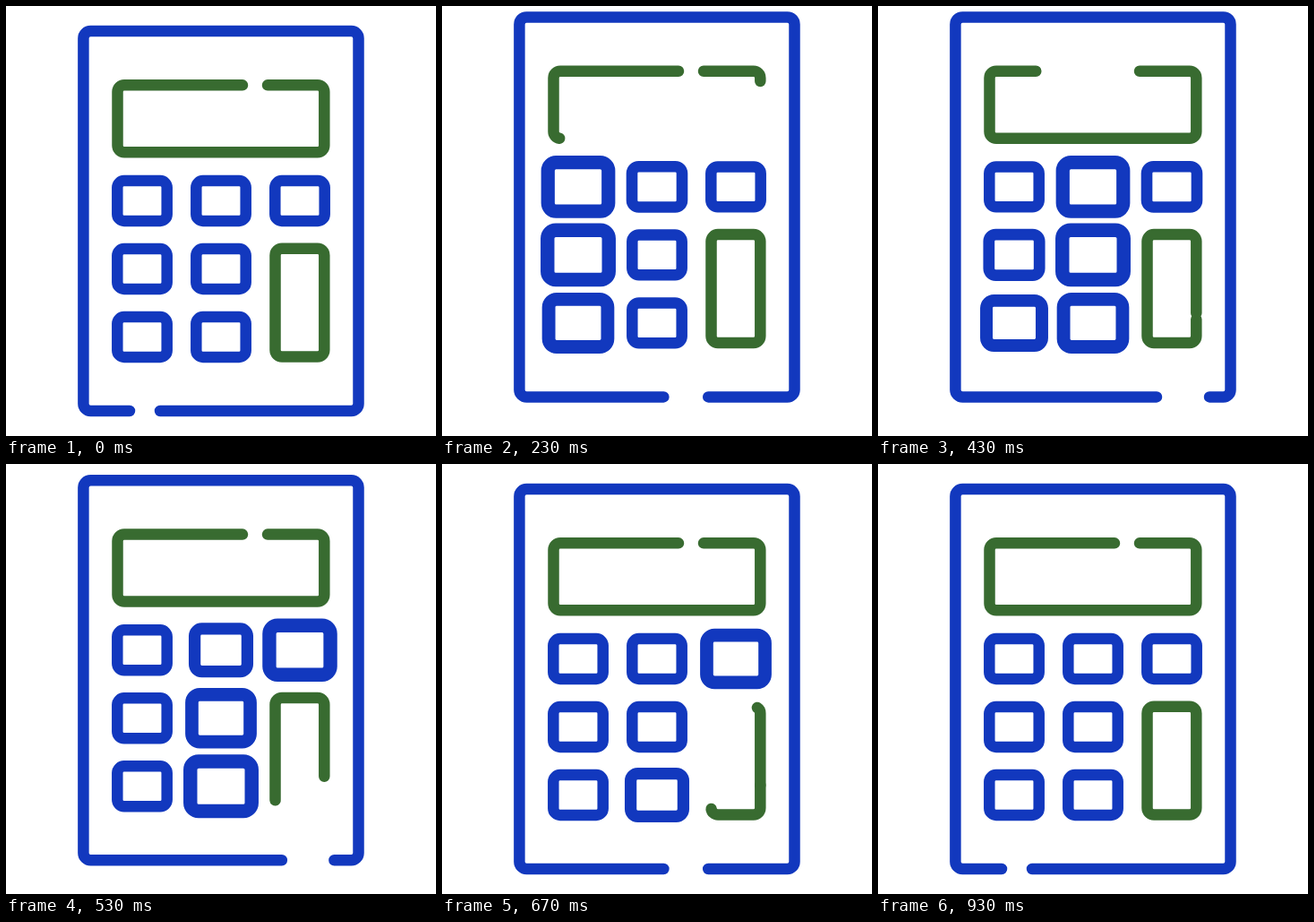
Write an HTML page that moves like this. It is 480x480 px and loops after 1530 ms.

```html
<!DOCTYPE html>
<html lang="en">
<head>
<meta charset="utf-8">
<title>Calculator</title>
<style>
  html, body { margin: 0; width: 100%; height: 100%; overflow: hidden; background: #fff; }
  svg { display: block; width: 100vw; height: 100vh; }
</style>
</head>
<body>
<svg id="stage" viewBox="0 0 480 480">
  <g id="body" fill="none" stroke-width="12.5" stroke-linecap="round"></g>
</svg>
<script>
const LOOP = 1530, LAST = 28;
const BLUE = '#1238be', GREEN = '#386b30';
const body = document.getElementById('body');

const clamp = x => Math.min(1, Math.max(0, x));
const mix = (a, b, p) => a + (b - a) * p;
const smooth = x => (x = clamp(x), x * x * (3 - 2 * x));

// Cubic timing curve with end heights 0 and 1
function curve(x1, x2) {
  return x => {
    if (x <= 0) return 0;
    if (x >= 1) return 1;
    let lo = 0, hi = 1;
    for (let i = 0; i < 24; i++) {
      const t = (lo + hi) / 2, u = 1 - t;
      if (3 * u * u * t * x1 + 3 * u * t * t * x2 + t * t * t < x) lo = t; else hi = t;
    }
    return lo * lo * (3 - 2 * lo);
  };
}
const hop = curve(.33, .3);
const steep = curve(.66, .34);

function add(name, attrs) {
  const el = document.createElementNS('http://www.w3.org/2000/svg', name);
  for (const k in attrs) el.setAttribute(k, attrs[k]);
  return body.appendChild(el);
}

// A stroke that is wiped from its start and then redrawn behind the wipe
function trimmed(d, wipe, redraw) {
  const parts = [0, 1].map(() => add('path', { d, stroke: GREEN, pathLength: 1 }));
  const show = (el, a, b) => {
    const on = b - a > .001;
    el.setAttribute('visibility', on ? 'visible' : 'hidden');
    if (!on) return;
    if (b - a > .999) {
      el.removeAttribute('stroke-dasharray');
      el.removeAttribute('stroke-dashoffset');
    } else {
      el.setAttribute('stroke-dasharray', `${b - a} 2`);
      el.setAttribute('stroke-dashoffset', -a);
    }
  };
  return n => {
    show(parts[0], 0, smooth((n - redraw[0]) / redraw[1]));
    show(parts[1], smooth((n - wipe[0]) / wipe[1]), 1);
  };
}

const frame = add('path', { stroke: BLUE });

const setDisplay = trimmed(
  'M292 88.3H347.8a7.5 7.5 0 0 1 7.5 7.5V155.8a7.5 7.5 0 0 1 -7.5 7.5H132' +
  'a7.5 7.5 0 0 1 -7.5 -7.5V95.8a7.5 7.5 0 0 1 7.5 -7.5H264',
  [0, 12], [4.5, 11.3]);

const setTall = trimmed(
  'M355.3 358.5V384a7.5 7.5 0 0 1 -7.5 7.5H308a7.5 7.5 0 0 1 -7.5 -7.5V278.2' +
  'a7.5 7.5 0 0 1 7.5 -7.5H347.8a7.5 7.5 0 0 1 7.5 7.5V358.5',
  [12, 12], [16, 12]);

// Keys pulse one after another, column by column
const keys = Array.from({ length: 7 }, (_, i) => ({
  x: 152 + 88 * Math.floor(i / 3),
  y: 217.5 + 76 * (i % 3),
  start: 2 * i,
  el: add('rect', { x: -27.7, y: -22.4, width: 55.4, height: 44.8, rx: 7.5, stroke: BLUE })
}));

function draw(ms) {
  const t = ms % LOOP, r = t % 100;
  const n = Math.min(LAST, Math.floor(t / 100) * 3 + (r >= 70 ? 2 : r >= 30 ? 1 : 0));

  body.setAttribute('transform', `translate(0 ${-16.9 * hop(1 - Math.abs(n - 10) / 10)})`);

  const p = n < 13.5 ? steep(n / 12.8) : 1 - steep((n - 14.2) / 12.8);
  frame.setAttribute('d',
    `M${mix(172, 370, p)} 452H385.5a8 8 0 0 0 8 -8V36a8 8 0 0 0 -8 -8H94.4` +
    `a8 8 0 0 0 -8 8V444a8 8 0 0 0 8 8H${mix(138, 311, p)}`);

  setDisplay(n);
  setTall(n);

  for (const k of keys) {
    const m = n - k.start;
    const s = 1 + .236 * Math.min(steep(m / 4.8), smooth((12 - m) / 6));
    k.el.setAttribute('transform', `translate(${k.x} ${k.y}) scale(${s})`);
  }
}

const begin = performance.now();
function tick() {
  draw(performance.now() - begin);
  requestAnimationFrame(tick);
}
draw(0);
requestAnimationFrame(tick);
</script>
</body>
</html>
```
